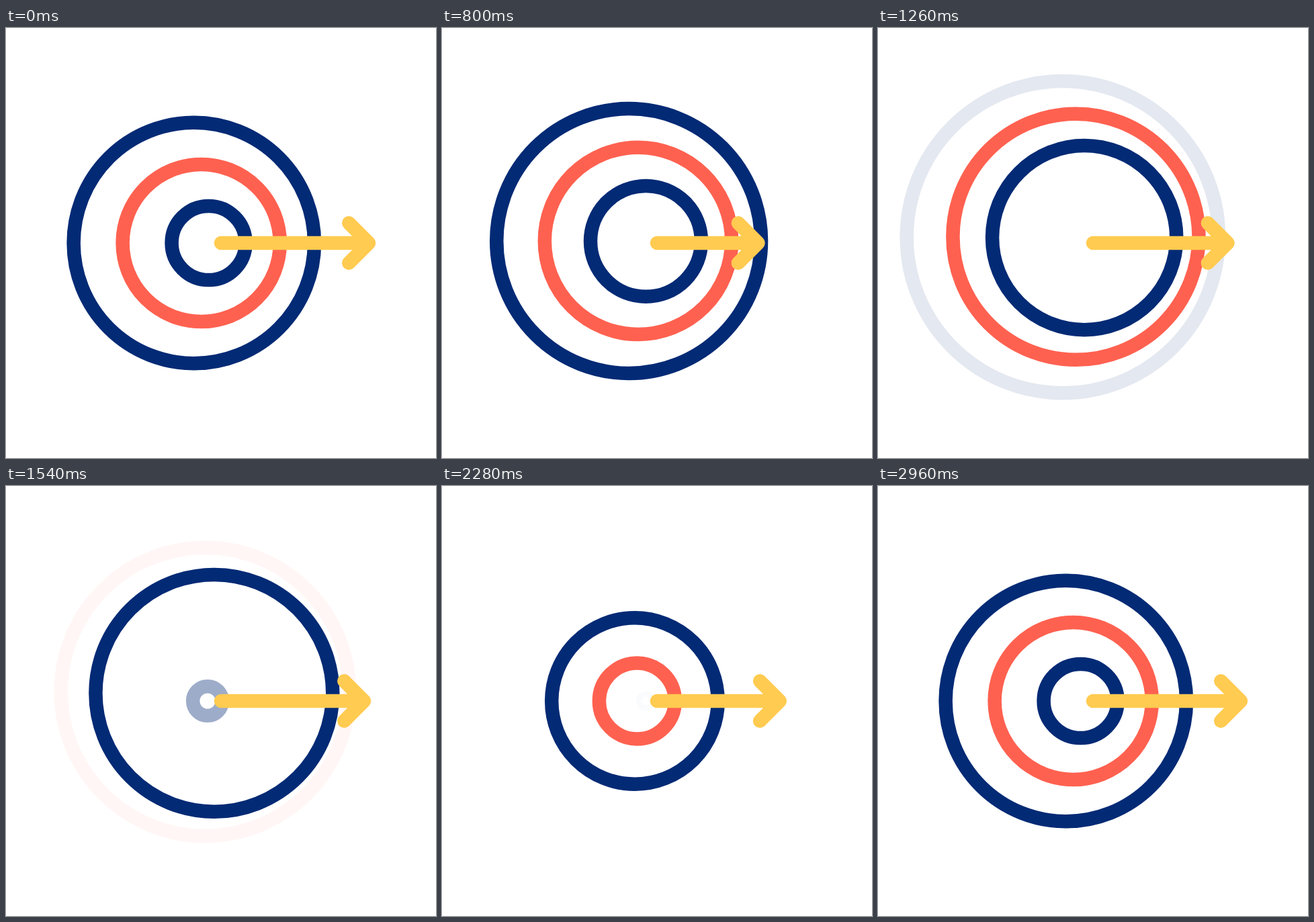
An HTML page for the animation above (3600 ms loop, 640x640 px).

```html
<!DOCTYPE html>
<html lang="en">
<head>
<meta charset="utf-8">
<title>Target</title>
<style>
  html, body { margin: 0; width: 100%; height: 100%; overflow: hidden; background: #fff; }
  svg { display: block; width: 100vw; height: 100vh; }
</style>
</head>
<body>
<svg viewBox="0 0 640 640" fill="none" stroke-width="20.5" stroke-linecap="round" stroke-linejoin="round">
  <g id="rings"></g>
  <path id="arrow" stroke="#ffcb50"/>
</svg>
<script>
const LOOP = 3600;
const MID = 320;
const NAVY = '#032a75';
const RED = '#ff6150';

const layer = document.getElementById('rings');
const arrow = document.getElementById('arrow');

// Smooth 0..1 progress between two times
function ease(t, from, to) {
  const u = Math.min(1, Math.max(0, (t - from) / (to - from)));
  return u * u * (3 - 2 * u);
}

function addRing(color) {
  const el = document.createElementNS(layer.namespaceURI, 'circle');
  el.setAttribute('stroke', color);
  layer.append(el);
  return el;
}

// Three resting places, outermost first.
// seed: x offset at birth; drift: shift while growing away; gone: end of fade-out
const slots = [
  { color: NAVY, seed: 23, drift: [-14.2, -25.6], gone: 1325 },
  { color: RED, seed: -0.7, drift: [10.9, -26.7], gone: 1585 },
  { color: NAVY, seed: 2, drift: [16.1, -22.8], gone: 1988 }
].map((slot, i) => ({
  ...slot,
  x: 279.8 + 10.9 * i,
  r: 179.2 - 62.1 * i,
  growth: 153 * 1.245 ** i,
  born: 1148 + 498 * i,
  seen: 1328 + 455 * i,
  oldRing: addRing(slot.color),
  newRing: addRing(slot.color)
}));

function setRing(el, cx, cy, r, opacity) {
  for (const [name, value] of Object.entries({ cx, cy, r, opacity }))
    el.setAttribute(name, value);
}

function drawSlot(slot, t) {
  const { x, r, drift: [dx, dy], gone } = slot;
  const away = ease(t, 270, 2770);
  setRing(slot.oldRing, x + dx * away, MID + dy * away,
    r + slot.growth * away, 1 - ease(t, gone - 320, gone));

  const grown = ease(t, slot.born, 2945);
  setRing(slot.newRing, x + slot.seed * (1 - grown), MID,
    r * grown, ease(t, slot.seen, slot.seen + 500));
}

// The arrow pulls in and stretches back twice
function drawArrow(t) {
  const pull = ease(t, 318, 958) - ease(t, 958, 1400)
             + ease(t, 1425, 2065) - ease(t, 2065, 2470);
  const tip = 540 - 82 * pull;
  const barb = 29.7;
  arrow.setAttribute('d', `M320 ${MID}H${tip}` +
    `M${tip - barb} ${MID - barb}L${tip} ${MID}L${tip - barb} ${MID + barb}`);
}

function draw(t) {
  for (const slot of slots) drawSlot(slot, t);
  drawArrow(t);
}

let start;
function tick(now) {
  start ??= now;
  draw((now - start) % LOOP);
  requestAnimationFrame(tick);
}

draw(0);
requestAnimationFrame(tick);
</script>
</body>
</html>
```
